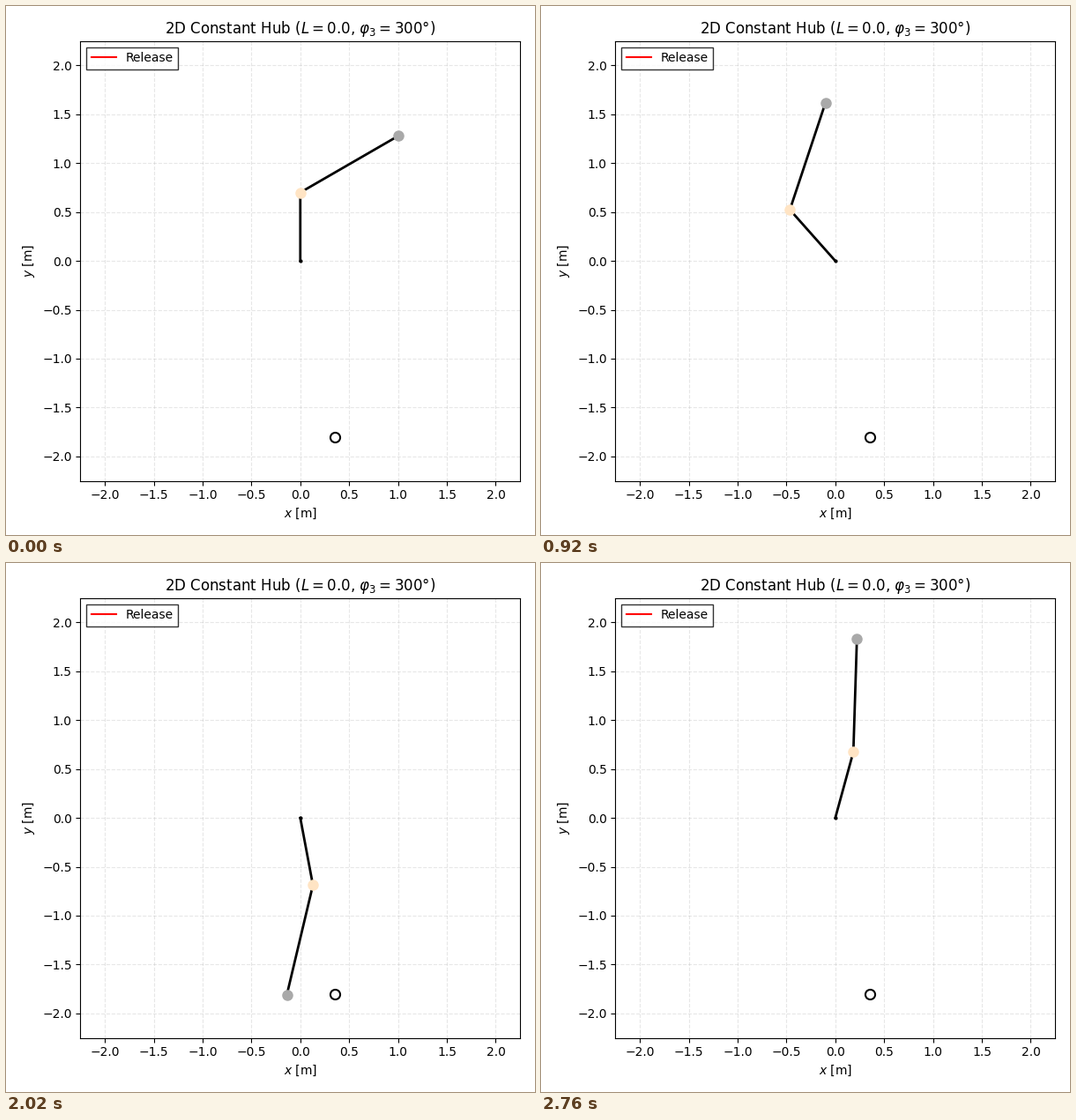
Animation of 600x600 px, one loop 2.78 s. Source, as a matplotlib script:

```python
import numpy as np
import matplotlib.pyplot as plt
from matplotlib.animation import FuncAnimation

FRAMES, STEP = 139, 20          # 2780 ms loop
ARM, CLUB = 0.7, 1.155          # link lengths [m]
BALL = (0.35, -1.8)

# Key poses: time [s], arm angle, arm rate, wrist angle, wrist rate [deg, deg/s].
# Constant acceleration with a locked wrist first, then the wrist swings free.
KEYS = np.array([
    [0.00, 90.0, 0.0, -60.0, 0.0],
    [1.00, 139.15, 98.3, -60.0, 0.0],
    [1.32, 175.5, 128.0, -58.2, 14.0],
    [1.76, 237.8, 155.0, -42.35, 65.0],
    [2.26, 324.6, 192.0, -6.5, 70.0],
    [2.76, 434.7, 242.0, 13.5, 9.0],
])


def hermite(t, col):
    """Cubic Hermite curve through one column and its rate column."""
    times = KEYS[:, 0]
    i = int(np.clip(np.searchsorted(times, t, side="right") - 1, 0, len(times) - 2))
    h = times[i + 1] - times[i]
    s = (t - times[i]) / h
    (p0, m0), (p1, m1) = KEYS[i:i + 2, col:col + 2]
    return ((2 * s**3 - 3 * s**2 + 1) * p0 + (3 * s**2 - 2 * s**3) * p1
            + h * ((s**3 - 2 * s**2 + s) * m0 + (s**3 - s**2) * m1))


def polar(length, degrees):
    a = np.radians(degrees)
    return length * np.array([np.cos(a), np.sin(a)])


def pose(t):
    arm = hermite(t, 1)
    wrist = polar(ARM, arm)
    head = wrist + polar(CLUB, arm + hermite(t, 3))
    return wrist, head


fig = plt.figure(figsize=(6, 6), dpi=100)
ax = fig.add_axes([84.4 / 600, 61.5 / 600, 498.8 / 600, 498.8 / 600])
ax.set(xlim=(-2.25, 2.25), ylim=(-2.25, 2.25), xlabel="$x$ [m]", ylabel="$y$ [m]")
ticks = np.arange(-2, 2.1, 0.5)
ax.set_xticks(ticks)
ax.set_yticks(ticks)
ax.set_title(r"2D Constant Hub ($L=0.0$, $\varphi_3=300$°)")
ax.grid(linestyle="--", alpha=0.3)

ax.plot([], [], color="red", label="Release")
ax.plot(*BALL, "o", ms=8, mfc="white", mec="black", mew=1.5)
links, = ax.plot([], [], color="black", lw=2)
ax.plot(0, 0, "o", color="black", ms=2)
wrist_dot, = ax.plot([], [], "o", color="bisque", ms=8)
head_dot, = ax.plot([], [], "o", color="darkgray", ms=8)
ax.legend(loc="upper left", fancybox=False, edgecolor="black")


def draw(frame):
    wrist, head = pose(frame * STEP / 1000)
    links.set_data([0, wrist[0], head[0]], [0, wrist[1], head[1]])
    wrist_dot.set_data([wrist[0]], [wrist[1]])
    head_dot.set_data([head[0]], [head[1]])
    return links, wrist_dot, head_dot


anim = FuncAnimation(fig, draw, frames=FRAMES, interval=STEP, repeat=True, repeat_delay=0)
plt.show()
```
